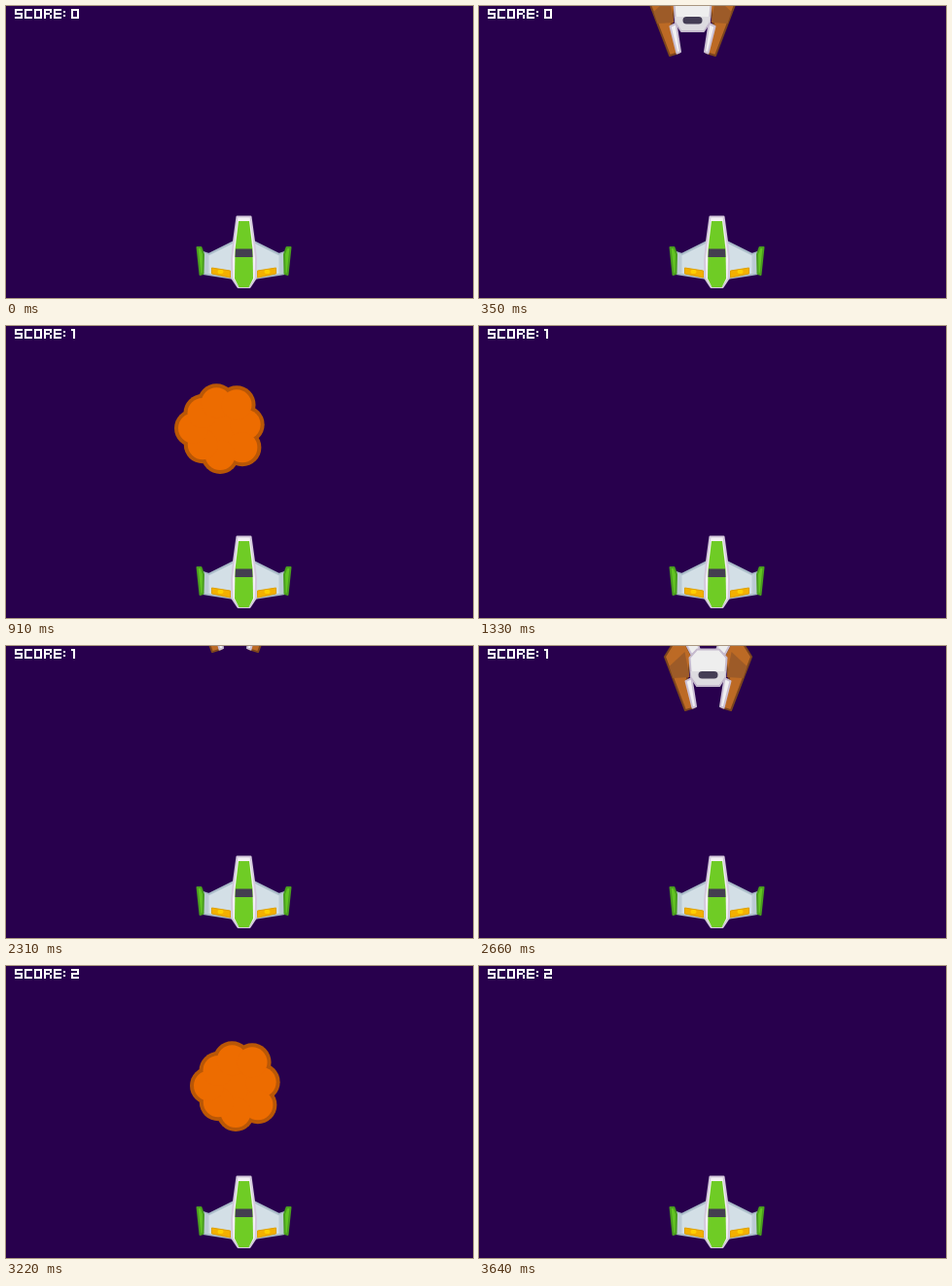
Write an HTML page with a canvas that moves like this. It is 480 by 300 pixels and loops after 3920 ms.

```html
<!DOCTYPE html>
<html lang="en">
<head>
<meta charset="utf-8">
<title>Space shooter</title>
<style>
html, body { margin: 0; width: 100%; height: 100%; overflow: hidden; background: #28004d; }
canvas { display: block; width: 480px; height: 300px; }
</style>
</head>
<body>
<canvas id="stage" width="480" height="300" role="img" aria-label="SCORE: 0"></canvas>
<script>
const canvas = document.getElementById('stage');
const ctx = canvas.getContext('2d');
const LOOP = 3920, STEP = 70;
const FALL = 12 / STEP, RISE = 18 / STEP;   // pixels per ms
const FLIGHT = 280, BLAST_FRAME = 100, BLAST_FRAMES = 4;

const waves = [
  { x: 219.5, enter: 70, hit: 910, hitY: 105.5 },
  { x: 235.5, enter: 2292, hit: 3220, hitY: 123.5 }
];

// Segment display on 4 x 5 cells: a-g as usual, the rest for R, 1 and the colon
const segments = {
  a: [0, 0, 4, 1], b: [3, 0, 1, 3], c: [3, 2, 1, 3], d: [0, 4, 4, 1],
  e: [0, 2, 1, 3], f: [0, 0, 1, 3], g: [0, 2, 4, 1],
  h: [3, 0, 1, 2], i: [0, 2, 3, 1], j: [3, 3, 1, 2],
  k: [0, 0, 2, 1], l: [1, 0, 1, 5], m: [0, 1, 1, 1], n: [0, 3, 1, 1]
};
const glyphs = {
  S: 'afgcd', C: 'afed', O: 'abcdef', R: 'afehij', E: 'afged',
  ':': 'mn', ' ': '', 0: 'abcdef', 1: 'kl', 2: 'abged'
};

function text(str, x, y, cell = 2) {
  ctx.fillStyle = '#fff';
  for (const ch of str) {
    for (const s of glyphs[ch]) {
      const [sx, sy, w, h] = segments[s];
      ctx.fillRect(x + sx * cell, y + sy * cell, w * cell, h * cell);
    }
    x += (ch === ':' || ch === ' ' ? 2 : 5) * cell;
  }
}

function poly(points, fill, line, width = 2) {
  ctx.beginPath();
  for (const [x, y] of points) ctx.lineTo(x, y);
  ctx.closePath();
  ctx.fillStyle = fill;
  ctx.fill();
  if (!line) return;
  ctx.strokeStyle = line;
  ctx.lineWidth = width;
  ctx.lineJoin = 'round';
  ctx.stroke();
}

// Shape given by its right half
function sym(half, fill, line) {
  poly([...half, ...half.map(([x, y]) => [-x, y]).reverse()], fill, line);
}

function at(x, y, draw, sx = 1, sy = sx) {
  ctx.save();
  ctx.translate(x, y);
  ctx.scale(sx, sy);
  draw();
  ctx.restore();
}

function bothSides(draw) {
  at(0, 0, draw);
  at(0, 0, draw, -1, 1);
}

function pill(x, y, w, h, fill) {
  ctx.fillStyle = fill;
  ctx.beginPath();
  ctx.roundRect(x, y, w, h, Math.min(w, h) / 2);
  ctx.fill();
}

function ship() {
  bothSides(() => {
    poly([[10, 27], [36, 40], [42, 38], [42, 60], [36, 61], [10, 65]], '#d3dfe6', '#a9bcc8');
    poly([[36, 41], [41, 39], [41, 59], [36, 60]], '#bccbd5');
    poly([[14, 57], [33, 54], [33, 60], [14, 64]], '#f3b000', '#dfa000', 1);
    pill(21, 56, 6, 4, '#ffd000');
    poly([[44, 33], [48, 33], [45, 61], [42, 60], [41.5, 40]], '#62c522', '#4a9d1f');
  });
  sym([[7, 1.5], [10.5, 27], [12.5, 45], [12, 65], [6, 74]], '#f4f1f6', '#d3c9dc');
  sym([[5.5, 6], [9, 35], [9.5, 65], [5, 74]], '#6fcc25');
  sym([[8.5, 34.5], [9, 43]], '#443d50');
}

function enemy() {
  bothSides(() => {
    poly([[29, -40], [44.5, -15], [23.5, 40], [14, 37], [22, 10], [17, -16]], '#bc6a25', '#7c451d');
    poly([[24, -20], [40, -5], [36, 7], [19, 6]], '#9d5b28');
    poly([[29, -40], [12, -33], [9, -23], [17, -17]], '#eee', '#cbc0d4');
    poly([[23, 10], [17, 7], [12.5, 36], [16, 37.5]], '#f1f0f2', '#cbc0d4');
  });
  sym([[11.5, -22.5], [19, -14], [17.5, 6], [11.5, 15]], '#eee', '#c5bacd');
  sym([[18, 0], [17, 6], [11, 14]], '#dddbe0');
  pill(-10, 0, 20, 7.5, '#443d55');
}

function disc(x, y, r) {
  ctx.beginPath();
  ctx.arc(x, y, r, 0, Math.PI * 2);
  ctx.fill();
}

// Ring of eight puffs, slightly uneven in angle and distance
function blast() {
  for (const [color, inset] of [['#b95706', 0], ['#ed6c00', 4]]) {
    ctx.fillStyle = color;
    disc(0, 0, 32 - inset);
    for (let i = 0; i < 8; i++) {
      const a = i * Math.PI / 4;
      const angle = a - 0.07 - 0.1 * Math.cos(a + 0.5);
      const dist = 27 + (i % 2) * 4.6 * Math.cos(a);
      disc(dist * Math.cos(angle), dist * Math.sin(angle), 19.5 - inset);
    }
  }
}

function drawWave({ x, enter, hit, hitY }, t) {
  if (t < hit) {
    at(x, (t - enter) * FALL - 37, enemy);
    const flown = t - (hit - FLIGHT);
    if (flown >= 0) pill(240.5, 203 - flown * RISE, 8, 30, '#6fcc25');
    return;
  }
  const n = Math.floor((t - hit) / BLAST_FRAME);
  if (n < BLAST_FRAMES) at(x, hitY, blast, 0.57 ** n);
}

function render(t) {
  ctx.fillStyle = '#28004d';
  ctx.fillRect(0, 0, canvas.width, canvas.height);
  for (const w of waves) drawWave(w, t);
  at(244.5, 215, ship);
  const label = 'SCORE: ' + waves.filter(w => t >= w.hit).length;
  text(label, 9, 3);
  canvas.setAttribute('aria-label', label);
}

const start = performance.now();
function tick() {
  const t = (performance.now() - start) % LOOP;
  render(Math.floor(t / STEP) * STEP);
  requestAnimationFrame(tick);
}
tick();
</script>
</body>
</html>
```
